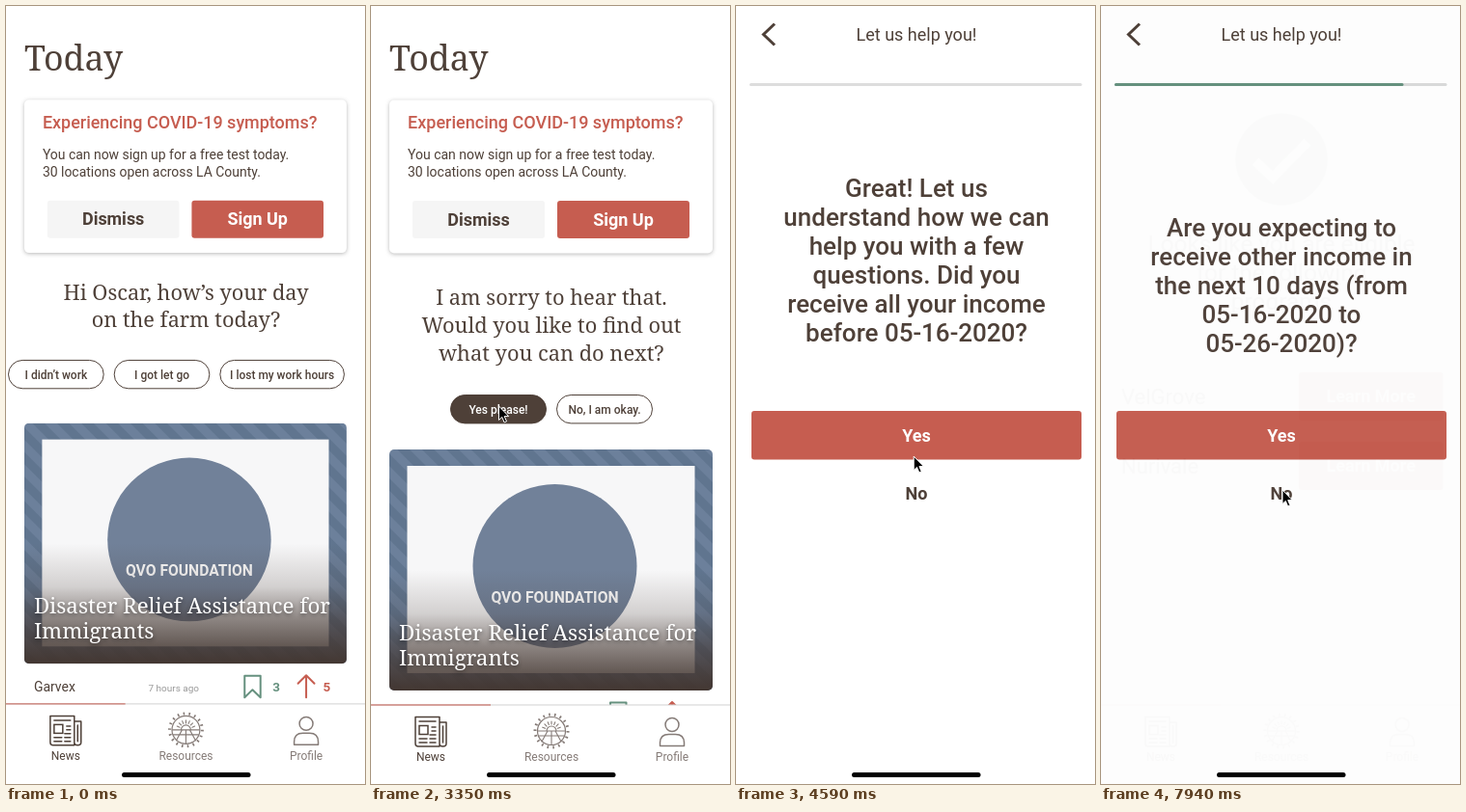
Write an HTML page that moves like this. It is 372x807 px and loops after 8 s.

```html
<!DOCTYPE html>
<html lang="en">
<head>
<meta charset="utf-8">
<title>Farm worker app</title>
<style>
html, body { margin: 0; width: 100%; height: 100%; overflow: hidden; background: #fff; }
svg { display: block; width: 372px; height: 807px; }
text { font-family: Roboto, sans-serif; fill: #4e4038; }
.slab { font-family: "Noto Serif", serif; }
.mid { text-anchor: middle; }
.med { font-weight: 500; }
.bold { font-weight: 700; }
.icon { fill: none; stroke-width: 1.5; stroke-linecap: round; stroke-linejoin: round; }
text.white { fill: #fff; }
text.red { fill: #c65d50; }
text.green { fill: #66917f; }
.panel { filter: drop-shadow(0 1px 2px rgba(0, 0, 0, .28)); }
.headline { filter: drop-shadow(0 2px 2px rgba(0, 0, 0, .45)); }
</style>
</head>
<body>
<svg id="stage" viewBox="0 0 372 807"></svg>
<script>
const BROWN = '#4e4038', RED = '#c65d50', GREEN = '#66917f', GRAY = '#857b77';
const LOOP = 8000;

const text = (x, y, size, content, cls = '', extra = '') =>
  `<text x="${x}" y="${y}" font-size="${size}" class="${cls}" ${extra}>${content}</text>`;
const lines = (x, y, step, size, cls, rows) =>
  rows.map((row, i) => text(x, y + i * step, size, row, cls)).join('');
const rect = (x, y, w, h, fill, r = 0, extra = '') =>
  `<rect x="${x}" y="${y}" width="${w}" height="${h}" rx="${r}" fill="${fill}" ${extra}/>`;
const icon = (d, color, extra = '') => `<path class="icon" d="${d}" stroke="${color}" ${extra}/>`;
const button = (x, y, w, h, fill, label, color = 'white') =>
  rect(x, y, w, h, fill, 3) + text(x + w / 2, y + h / 2 + 6.3, 18, label, `mid bold ${color}`);
const pill = (x, y, w, label, filled) =>
  rect(x, y, w, 29.4, filled ? BROWN : '#fff', 14.7, `stroke="${BROWN}"`) +
  text(x + w / 2, y + 19.5, 12, label, `mid med ${filled ? 'white' : ''}`);
const page = () => rect(0, 0, 373.5, 808.5, '#fff');
const indicator = () => rect(120, 795, 133.5, 5, '#000', 2.5);

function resourcesIcon() {
  let rays = '';
  for (let i = 0; i < 9; i++) {
    const a = Math.PI * (1 + i / 8), c = Math.cos(a), s = Math.sin(a);
    rays += `M${187 + 7 * c} ${752 + 7 * s}L${187 + 10 * c} ${752 + 10 * s}`;
  }
  return icon('M173 752H201M182 752A5 5 0 0 1 192 752M187 752V766M183 752L177 763M191 752L197 763M174 757H200' + rays, GRAY, 'style="stroke-width:1.1"') +
    `<circle class="icon" cx="187" cy="752" r="14.5" stroke="${GRAY}" style="stroke-width:1.2"/>` +
    `<circle class="icon" cx="187" cy="752" r="17" stroke="${GRAY}" stroke-dasharray="1.6 4.3" style="stroke-width:3;stroke-linecap:butt"/>`;
}

const nav = () =>
  rect(0, 725, 374, 84, '#fff') + rect(0, 724.5, 374, 1, '#d2d2d2') +
  rect(0, 724.5, 124, 1, RED) +
  icon('M46 737.5H71V768H49Q46 768 46 765ZM71 743H78V765Q78 768 74.5 768Q71 768 71 765M74.5 747V764' +
    'M50 742H67M63 748H67M63 752H67M50 760H58M50 764H58M61 756H67M61 760H67M61 764H67', BROWN) +
  rect(50, 746.5, 9, 9, 'none', 0, `stroke="${BROWN}" stroke-width="1.5"`) +
  resourcesIcon() +
  `<circle class="icon" cx="312" cy="745.5" r="7" stroke="${GRAY}"/>` +
  icon('M299.5 767.5V764.5Q299.5 755.5 308.5 755.5H315.5Q324.5 755.5 324.5 764.5V767.5Z', GRAY) +
  text(62, 783, 12, 'News', 'mid') +
  text(187, 783, 12, 'Resources', 'mid', `style="fill:${GRAY}"`) +
  text(312, 783, 12, 'Profile', 'mid', `style="fill:${GRAY}"`);

const header = () =>
  text(19, 67, 35.8, 'Today', 'slab') +
  rect(19, 97.5, 335, 159, '#fff', 5, 'class="panel"') +
  text(38, 127, 18.03, 'Experiencing COVID-19 symptoms?', 'med red') +
  lines(38, 159, 18, 14, '', ['You can now sign up for a free test today.', '30 locations open across LA County.']) +
  button(43, 202, 137, 39, '#f5f5f5', 'Dismiss', '') +
  button(193, 202, 137, 39, RED, 'Sign Up');

const story = dy => `<g transform="translate(0 ${dy})">
  <g clip-path="url(#card)">
    ${rect(19, 460, 335, 250, 'url(#stripes)')}
    ${rect(37.5, 477, 298, 215, '#f7f7f8')}
    <circle cx="190.5" cy="581" r="85" fill="#718199"/>
    ${text(190.5, 618.5, 15.7, 'QVO FOUNDATION', 'mid bold white')}
    ${rect(19, 460, 335, 250, 'url(#shade)')}
  </g>
  <g class="headline">${lines(29, 658, 26, 22.4, 'slab white', ['Disaster Relief Assistance for', 'Immigrants'])}</g>
  ${text(29, 739, 14, 'Garvex')}
  ${text(148, 739, 10, '7 hours ago', '', 'style="fill:#999"')}
  ${icon('M248 722.5H264.5V745L256.2 737L248 745Z', GREEN, 'style="stroke-width:2"')}
  ${text(277, 739, 13.5, '3', 'bold green')}
  ${icon('M312 745V722M303.5 730.5L312 722L320.5 730.5', RED, 'style="stroke-width:2"')}
  ${text(329.5, 739, 13.5, '5', 'bold red')}
</g>`;

const home = () => `<g transform="scale(.997 .9985)">${page()}${header()}
  ${lines(187, 305, 29, 21.8, 'slab mid', ['Hi Oscar, how’s your day', 'on the farm today?'])}
  ${pill(2.5, 368, 99, 'I didn’t work')}${pill(112.5, 368, 99, 'I got let go')}${pill(222.5, 368, 129, 'I lost my work hours')}
  ${story(-26.7)}${nav()}</g>${indicator()}`;

const sorry = () => `<g id="sorry">${page()}${header()}
  ${lines(187, 310, 29, 21.8, 'slab mid', ['I am sorry to hear that.', 'Would you like to find out', 'what you can do next?'])}
  ${pill(82.5, 403.5, 99, 'Yes please!', true)}${pill(192.5, 403.5, 99, 'No, I am okay.')}
  ${story(0)}${nav()}${indicator()}</g>`;

const question = (id, y, rows) => `<g id="${id}">${lines(187, y, 30, 26, 'mid med', rows)}</g>`;
const topBar = () =>
  `<path d="M40 18.5L28.5 29.5L40 40.5" fill="none" stroke="${BROWN}" stroke-width="3"/>` +
  text(187, 36, 18, 'Let us help you!', 'mid') + rect(14, 80, 344.5, 3, '#ddd', 1.5);

const form = () => `<g id="form">${page()}${topBar()}
  ${rect(14, 80, 0, 3, GREEN, 1.5, 'id="progress"')}
  ${question('q1', 198, ['Great! Let us', 'understand how we can', 'help you with a few', 'questions. Did you', 'receive all your income', 'before 05-16-2020?'])}
  ${question('q2', 268, ['There will be no more', 'income coming from', 'your last employer', '(Tarvy Plumbrook Inc.).'])}
  ${question('q3', 239, ['Are you expecting to', 'receive other income in', 'the next 10 days (from', '05-16-2020 to', '05-26-2020)?'])}
  ${button(16, 420, 342, 50.5, RED, 'Yes')}
  ${text(187, 512, 18, 'No', 'mid bold')}${indicator()}</g>`;

const program = (y, name) =>
  text(21, y + 33, 22, name) + button(205, y, 149.5, 50, RED, 'Learn More');
const result = () => `<g id="result">${page()}${topBar()}${rect(14, 80, 344.5, 3, GREEN, 1.5)}
  <circle cx="187" cy="159" r="47.5" fill="${GREEN}"/>
  <path d="M160 161L178 178L214 141" fill="none" stroke="#fff" stroke-width="10"/>
  ${lines(187, 255, 30, 24.4, 'mid', ['Looks like you are eligible', 'for the following', 'programs'])}
  ${program(380, 'VelGrove')}${program(452, 'Nurivale')}${nav()}${indicator()}</g>`;

document.getElementById('stage').innerHTML = `<defs>
  <clipPath id="card">${rect(19, 460, 335, 250, '#000', 5)}</clipPath>
  <pattern id="stripes" width="18" height="18" patternUnits="userSpaceOnUse" patternTransform="rotate(-45)">
    ${rect(0, 0, 18, 18, '#6c809b')}${rect(0, 0, 9, 18, '#60758f')}</pattern>
  <linearGradient id="shade" x1="0" y1="0" x2="0" y2="1">
    <stop offset=".5" stop-color="#42352f" stop-opacity="0"/>
    <stop offset=".68" stop-color="#42352f" stop-opacity=".2"/>
    <stop offset=".82" stop-color="#42352f" stop-opacity=".6"/>
    <stop offset="1" stop-color="#42352f" stop-opacity=".97"/></linearGradient>
  </defs>${home()}${sorry()}${form()}${result()}${rect(0, 0, 372, 807, '#000', 0, 'id="veil"')}
  <path id="cursor" d="M0 0V14.5L3.3 11.4L5.6 16.9L8 15.9L5.7 10.6H10.2Z" stroke="#fff"/>`;

const el = Object.fromEntries(['sorry', 'form', 'result', 'veil', 'cursor', 'progress', 'q1', 'q2', 'q3']
  .map(id => [id, document.getElementById(id)]));

// Pointer positions: time, x, y
const POINTER = [
  [0, 400, 900], [469, 400, 900], [470, 272, 801], [529, 272, 801], [530, 400, 900], [819, 400, 900],
  [820, 361, 431], [1290, 270, 385], [1740, 270, 385], [1760, 273, 383], [2700, 273, 383],
  [3120, 132.5, 415], [3350, 132.5, 415], [3410, 133.5, 411], [4120, 133.5, 411],
  [4650, 186, 469], [4860, 186, 469], [4880, 190, 471], [5640, 190, 471], [5760, 189, 473],
  [5880, 189, 473], [6380, 188, 502], [LOOP, 188, 502]
];

const smooth = (t, from, to) => {
  const u = Math.min(1, Math.max(0, (t - from) / (to - from)));
  return u * u * (3 - 2 * u);
};
const dissolve = (t, start, from, to) =>
  t < from ? 0 : t > to ? 1 : 1 - Math.exp(-(((t - start) / 276) ** 2.7));

function draw(t) {
  const fades = [dissolve(t, 1585, 1940, 2090), dissolve(t, 3350, 3350, 4070), dissolve(t, 7880, 7880, LOOP)];
  ['sorry', 'form', 'result'].forEach((id, i) => el[id].setAttribute('opacity', fades[i]));
  // Dissolving screens dip towards black
  el.veil.setAttribute('opacity', fades.reduce((sum, p) => sum + 1.55 * p ** 1.3 * (1 - p), 0));

  const next = smooth(t, 6400, 7000), second = t >= 5060;
  el.q1.setAttribute('opacity', second ? 0 : 1);
  el.q2.setAttribute('opacity', second ? 1 - next : 0);
  el.q3.setAttribute('opacity', next);
  el.progress.setAttribute('width', second ? 173.5 + 126 * next : 0);

  const i = POINTER.findIndex(key => key[0] > t);
  const [t0, x0, y0] = POINTER[i - 1], [t1, x1, y1] = POINTER[i];
  const u = smooth(t, t0, t1);
  el.cursor.setAttribute('transform', `translate(${x0 + (x1 - x0) * u} ${y0 + (y1 - y0) * u})`);
}

const begin = performance.now();
function tick() {
  draw((performance.now() - begin) % LOOP);
  requestAnimationFrame(tick);
}
tick();
</script>
</body>
</html>
```
